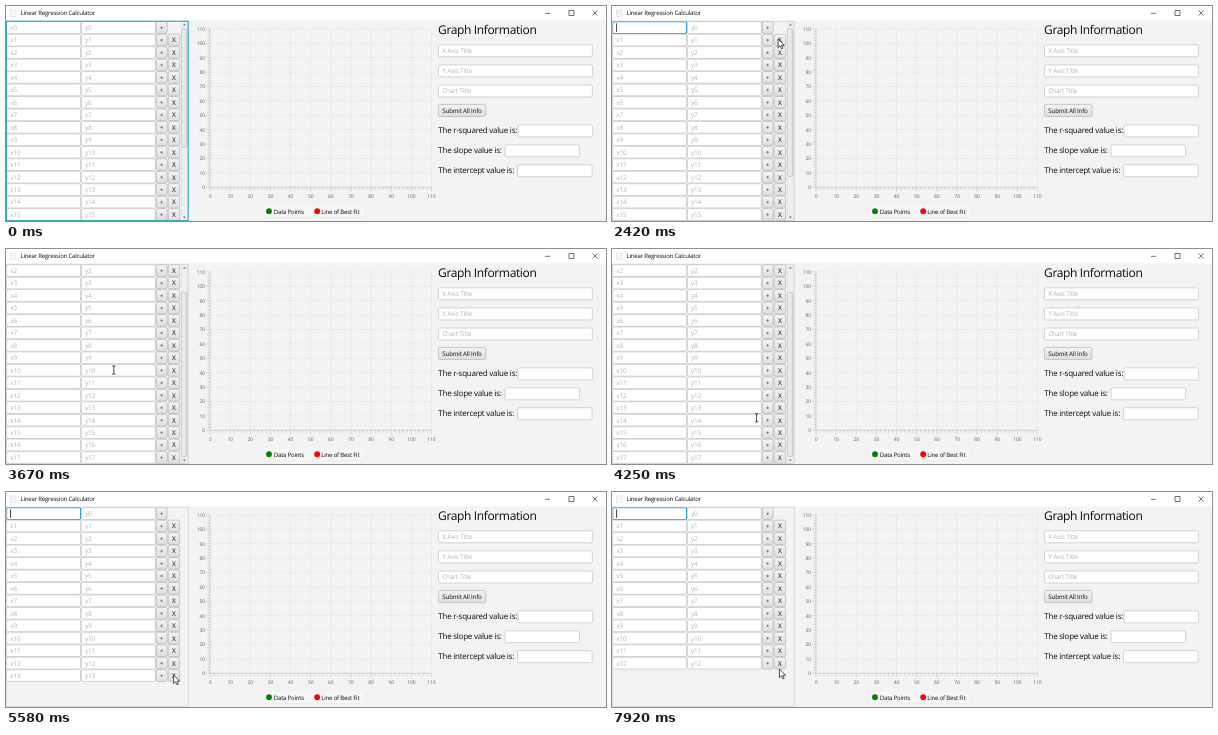
Animation of 600x215 px, one loop 8000 ms. Source, as an HTML page:

```html
<!DOCTYPE html>
<html lang="en">
<head>
<meta charset="utf-8">
<title>Linear Regression Calculator</title>
<style>
  html, body { margin: 0; width: 100%; height: 100%; overflow: hidden; background: #f3f2f4; }
  svg { display: block; width: 600px; height: 215px; }
  text { font-family: "Open Sans", "Noto Sans", sans-serif; letter-spacing: -.03em; fill: #0c0c0c; text-rendering: geometricPrecision; }
  .prompt { fill: #b4b4b4; }
  .tick { fill: #666; }
  .field { fill: #fff; stroke: #cacaca; stroke-width: .8; }
  .button { fill: url(#face); stroke: #bcbcbc; stroke-width: .8; }
  .focus { stroke: #2a9fca; stroke-width: 1.2; }
</style>
</head>
<body>
<svg id="stage" viewBox="0 0 600 215" xmlns="http://www.w3.org/2000/svg">
  <defs>
    <linearGradient id="face" x2="0" y2="1">
      <stop offset="0" stop-color="#f4f4f4"/><stop offset="1" stop-color="#dedede"/>
    </linearGradient>
    <linearGradient id="thumbFace">
      <stop offset="0" stop-color="#f2f2f2"/><stop offset="1" stop-color="#dedede"/>
    </linearGradient>
    <clipPath id="paneClip"><rect y="15" width="182.5" height="200"/></clipPath>
  </defs>
</svg>
<script>
const LOOP = 8000, STEP = 1000 / 12;
const TOP = 15.7, PITCH = 12.46, VISIBLE = 16;
const TRACK_TOP = 23, TRACK = 184.5;
const stage = document.getElementById('stage');

function add(parent, tag, attrs, content) {
  const el = document.createElementNS('http://www.w3.org/2000/svg', tag);
  for (const key in attrs) el.setAttribute(key, attrs[key]);
  if (content !== undefined) el.textContent = content;
  parent.appendChild(el);
  return el;
}
const label = (parent, x, y, size, str, cls = '', anchor = 'start') =>
  add(parent, 'text', { x, y, 'font-size': size, class: cls, 'text-anchor': anchor }, str);
const box = (parent, x, y, width, height, cls) =>
  add(parent, 'rect', { x, y, width, height, rx: 1.4, class: cls });
const path = (parent, d, stroke, width = 1, fill = 'none') =>
  add(parent, 'path', { d, stroke, 'stroke-width': width, fill });
const show = (el, on) => el.setAttribute('visibility', on ? 'inherit' : 'hidden');

function drawWindow() {
  add(stage, 'rect', { width: 600, height: 215, fill: '#f3f2f4' });
  add(stage, 'rect', { width: 600, height: 14.5, fill: '#fff' });
  add(stage, 'rect', { x: 4.5, y: 4, width: 5.5, height: 6.5, fill: '#fff', stroke: '#dcdcdc', 'stroke-width': .7 });
  path(stage, 'M5.5 6h3.5M5.5 8h3.5', '#d5dde4', .6);
  label(stage, 14.5, 9.4, 6, 'Linear Regression Calculator');
  path(stage, 'M539 7.3h5M563 4.5h5v5h-5zM586.6 4.5l5 5m0-5l-5 5', '#333', .7);
}

function drawChart() {
  const x0 = 204, y0 = 181.3, dx = 20.13, dy = 14.4;
  const right = x0 + 11 * dx, top = y0 - 11 * dy;
  let grid = '', ticks = `M${x0} ${top}V${y0}H${right}`;
  for (let i = 0; i <= 55; i++) {
    const x = x0 + i * dx / 5, y = y0 - i * dy / 5, major = i % 5 === 0;
    const len = major ? 4 : 2.5;
    ticks += `M${x} ${y0}v${len}M${x0} ${y}h${-len}`;
    if (!major) continue;
    grid += `M${x} ${y0}V${top}M${x0} ${y}H${right}`;
    label(stage, x, 191.8, 5, i * 2, 'tick', 'middle');
    label(stage, 199, y + 1.9, 5, i * 2, 'tick', 'end');
  }
  path(stage, grid, '#d9d9d9', .6).setAttribute('stroke-dasharray', '1.5 1.5');
  path(stage, ticks, '#bcbcbc', .55);

  add(stage, 'rect', { x: 256.5, y: 198.8, width: 102.5, height: 12.7, rx: 2, fill: '#f6f6f7', stroke: '#ebebec', 'stroke-width': .6 });
  add(stage, 'circle', { cx: 263, cy: 205.2, r: 2.9, fill: '#008000' });
  label(stage, 267.8, 207.5, 6, 'Data Points');
  add(stage, 'circle', { cx: 311.2, cy: 205.2, r: 2.9, fill: '#f00' });
  label(stage, 315.3, 207.5, 6, 'Line of Best Fit');
}

function drawInfo() {
  label(stage, 432, 28.1, 12, 'Graph Information');
  ['X Axis Title', 'Y Axis Title', 'Chart Title'].forEach((str, i) => {
    const y = 38.8 + i * 20.1;
    box(stage, 432.4, y, 154, 12, 'field');
    label(stage, 436.2, y + 8.3, 6.5, str, 'prompt');
  });
  box(stage, 432.4, 98.4, 47.4, 12.2, 'button');
  label(stage, 456, 106.8, 6.2, 'Submit All Info', '', 'middle');
  [['r-squared', 512], ['slope', 499], ['intercept', 511.5]].forEach(([name, x], i) => {
    const y = 118.9 + i * 19.9;
    label(stage, 432.3, y + 8.4, 8, `The ${name} value is:`);
    box(stage, x, y, 74.6, 12, 'field');
  });
}

function makeRow(parent, i) {
  const g = add(parent, 'g', {}), y = TOP + i * PITCH, base = y + 8.3;
  const field = box(g, .6, y, 74, 11.8, 'field');
  box(g, 75.4, y, 74, 11.8, 'field');
  const prompt = label(g, 4.3, base, 6.5, 'x' + i, 'prompt');
  label(g, 79, base, 6.5, 'y' + i, 'prompt');
  box(g, 150.3, y, 10.8, 11.8, 'button');
  path(g, `M154.3 ${y + 6}h2.6M155.6 ${y + 4.7}v2.6`, '#666', .7);
  let remove = null;
  if (i) {
    remove = box(g, 162.2, y, 11.4, 11.8, 'button');
    label(g, 167.8, base, 6.5, 'X', '', 'middle');
  }
  return { g, field, prompt, remove };
}

drawWindow();
drawChart();
drawInfo();

const pane = add(stage, 'g', { 'clip-path': 'url(#paneClip)' });
const list = add(pane, 'g', {});
const rows = Array.from({ length: 18 }, (_, i) => makeRow(list, i));
const caret = path(list, 'M4.6 17.3v8.6', '#111', .8);

const bar = add(pane, 'g', {});
add(bar, 'rect', { x: 175.2, y: 15.4, width: 6.4, height: 199.2, fill: '#eeeeef', stroke: '#dadada', 'stroke-width': .5 });
path(bar, 'M176.9 19.6l1.5-1.8 1.5 1.8zM176.9 210.6l1.5 1.8 1.5-1.8z', 'none', 0, '#777');
const thumb = add(bar, 'rect', { x: 175.6, width: 5.2, rx: 1.5, fill: 'url(#thumbFace)', stroke: '#bcbcbc', 'stroke-width': .7 });
const edge = add(stage, 'rect', { x: .4, y: 15.2, width: 181.8, height: 199.4, fill: 'none' });

const arrow = path(stage, 'M0 0v8.6l2-1.8 1.4 3 1.4-.6-1.4-2.9h2.7z', '#111', .7, '#fff');
const beam = path(stage, 'M-1.6-4h3.2M0-4v8M-1.6 4h3.2', '#222', .8);

// [time, row count, focus]: -1 is the pane, 0 the first field, k the X button of row k
const events = [[0, 25, -1], [1420, 25, 1], [1500, 24, 0]];
[1670, 1920, 2170, 2330, 2580, 2830].forEach((t, i) =>
  events.push([t, 24 - i, 1], [t + (t === 2330 || t > 2500 ? 90 : 80), 23 - i, 0]));
events.push(
  [4580, 18, 15], [4750, 17, 0], [5000, 17, 13], [5170, 16, 0],
  [5330, 16, 13], [5420, 15, 0], [5500, 15, 13], [5580, 14, 0],
  [5920, 14, 13], [7750, 13, 0]);

// [time, x, y] of the mouse
const moves = [
  [830, 186, 212], [1330, 166.1, 33], [3160, 166.1, 33], [3250, 107.8, 121],
  [3900, 107.8, 121], [4200, 140, 166], [4500, 167.6, 183], [6400, 167.6, 183],
  [6670, 167.4, 180], [7740, 167.4, 180], [7920, 167.4, 177]];

function mouseAt(t) {
  const q = Math.floor((t + 5) / STEP) * STEP;
  const k = moves.findIndex(m => m[0] > q + 5);
  if (k < 0) return moves[moves.length - 1].slice(1);
  if (k === 0) return moves[0].slice(1);
  const [t0, x0, y0] = moves[k - 1], [t1, x1, y1] = moves[k];
  const u = (q - t0) / (t1 - t0);
  return [x0 + (x1 - x0) * u, y0 + (y1 - y0) * u];
}

function render(t) {
  const [since, count, focus] = events.filter(e => e[0] <= t).pop();
  const scroll = t < 3580 || t >= 4750 ? 0 : t < 3670 ? 1 : 2;

  list.setAttribute('transform', `translate(0 ${-scroll * PITCH})`);
  rows.forEach((row, i) => {
    show(row.g, i < count);
    if (row.remove) row.remove.setAttribute('class', focus === i ? 'button focus' : 'button');
  });
  rows[0].field.setAttribute('class', focus === 0 ? 'field focus' : 'field');
  show(rows[0].prompt, focus !== 0);
  show(caret, focus === 0 && (t - since) % 1000 < 500);

  show(bar, count >= VISIBLE);
  thumb.setAttribute('y', TRACK_TOP + TRACK * scroll / count);
  thumb.setAttribute('height', TRACK * Math.min(1, VISIBLE / count));
  edge.setAttribute('stroke', focus < 0 ? '#2fa5c6' : '#d0d0d0');
  edge.setAttribute('stroke-width', focus < 0 ? 1.1 : .7);

  const [x, y] = mouseAt(t), overField = x < 149;
  const at = `translate(${x} ${y})`;
  arrow.setAttribute('transform', at);
  beam.setAttribute('transform', at);
  show(arrow, t >= 830 && !overField);
  show(beam, t >= 830 && overField);
}

const start = performance.now();
function tick() {
  render((performance.now() - start) % LOOP);
  requestAnimationFrame(tick);
}
tick();
</script>
</body>
</html>
```
